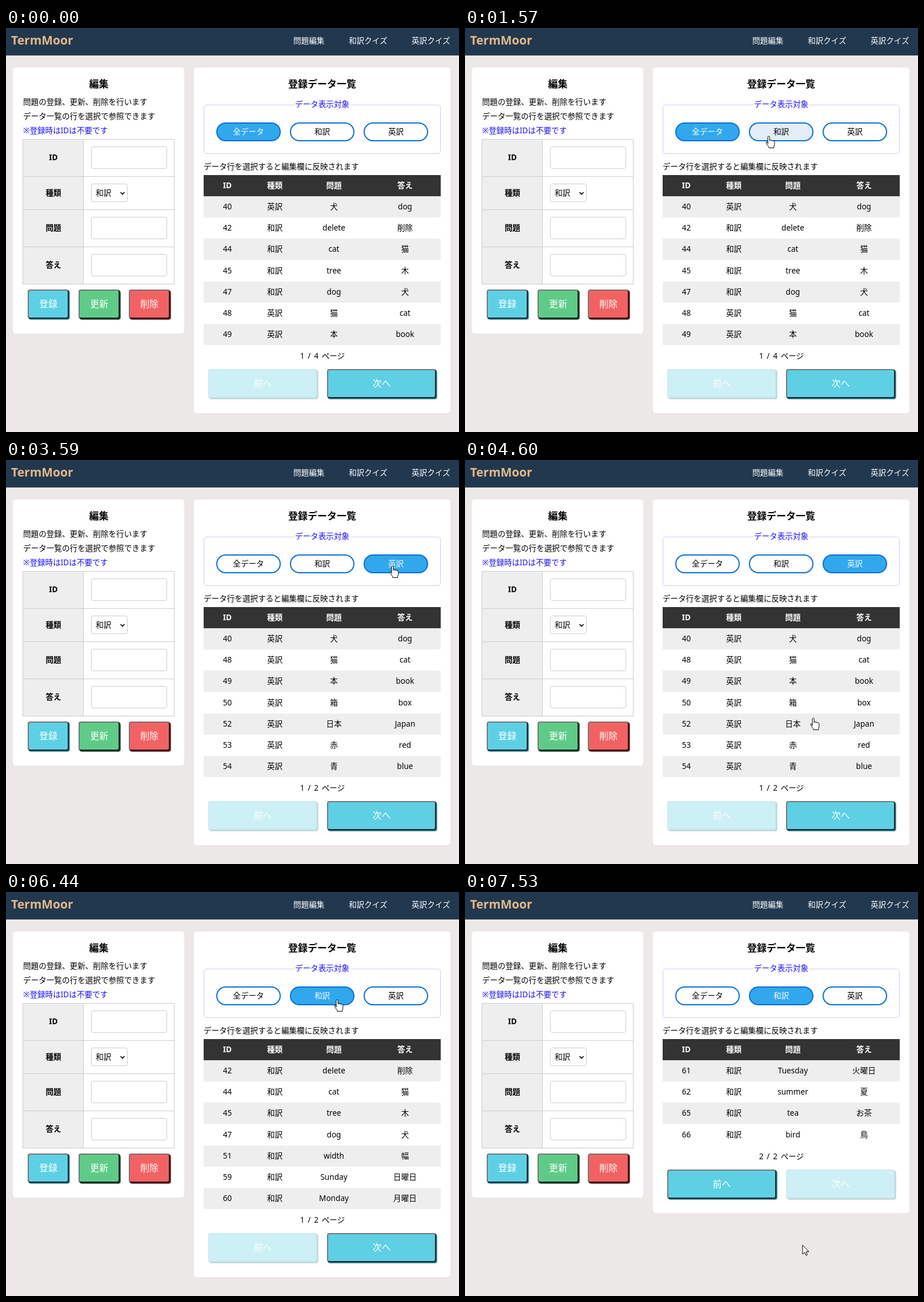
Recreate the animation shown at these times as an HTML page. Size 793 by 706 pixels, loop 7990 ms.

```html
<!DOCTYPE html>
<html lang="ja">
<head>
<meta charset="utf-8">
<title>TermMoor</title>
<style>
html, body { margin: 0; width: 100%; height: 100%; overflow: hidden; background: #ece8e7; }
body { position: relative; font: 13.6px/20px "Noto Sans", "Noto Sans CJK JP", sans-serif; color: #000; }
div { position: absolute; box-sizing: border-box; white-space: pre; }
.mid { width: 300px; text-align: center; }
.b { font-weight: 700; }
.head { font-size: 17px; font-weight: 700; }
.blue { color: #1a0dff; }
.white { color: #fff; }
.wide { word-spacing: 2.2px; }
.panel { background: #fff; border-radius: 5px; }
.field { background: #fff; border: 1px solid #ccc; border-radius: 4px; }
.pill { border: 2px solid #0a6fd3; border-radius: 17px; background: #fff; line-height: 28px; text-align: center; }
.pill.hover { background: #e3eef9; }
.pill.on { background: #31a8ee; color: #fff; }
.btn { border: 2px outset #767676; border-radius: 4px; color: #fff; font-size: 16px; line-height: 46px; text-align: center; }
.cyan { background: #5ed0e4; box-shadow: 1.7px 1.7px #1f7f93; }
.green { background: #5ecb88; box-shadow: 1.7px 1.7px #0f4a2c; }
.red { background: #f26263; box-shadow: 1.7px 1.7px #6d1018; }
.off { opacity: .3; border-color: rgba(118, 118, 118, .3); }
.dim { opacity: .8; }
svg { position: absolute; left: 0; top: 0; overflow: visible; }
</style>
</head>
<body>
<div id="page" style="left:0;top:0;width:793px;height:706px"></div>
<svg width="1" height="1"><path id="cursor" fill="#fff" stroke="#000" stroke-linejoin="round"/></svg>
<script>
const LOOP = 7990, ROW = 37.2;
const HAND = 'M-2 13V1.8a1.6 1.6 0 0 1 3.2 0V8q.3-1.6 1.6-1.5 1.4.1 1.5 1.7 .4-1.2 1.6-1 1.2.2 1.3 1.6 .5-.9 1.4-.6 1.3.5 1.3 2V14q0 2-1.2 4V20.5H0V19q-2-2.5-4.5-6.5 -1.2-2 .1-2.6 1.3-.4 2.4 1.6z';
const ARROW = 'M0 0V16L3.7 12.6 6 18 8.4 17 6.1 11.7H11Z';

const EN = '英訳', JA = '和訳';
const rows = (kind, list) => list.split(',').map(s => {
  const [id, q, a] = s.split(' ');
  return [id, kind, q, a];
});
const enRows = rows(EN, '40 犬 dog,48 猫 cat,49 本 book,50 箱 box,52 日本 Japan,53 赤 red,54 青 blue');
const jaRows = rows(JA, '42 delete 削除,44 cat 猫,45 tree 木,47 dog 犬,51 width 幅,59 Sunday 日曜日,60 Monday 月曜日');
const views = [
  { pos: '1 / 4', rows: [...jaRows.slice(0, 4), ...enRows.slice(0, 3)].sort((a, b) => a[0] - b[0]) },
  { pos: '1 / 2', rows: jaRows },
  { pos: '1 / 2', rows: enRows },
  { pos: '2 / 2', last: true, rows: rows(JA, '61 Tuesday 火曜日,62 summer 夏,65 tea お茶,66 bird 鳥') }
];
const pills = ['全データ', JA, EN];
const pillX = i => 368 + i * 129;

// [time, value] pairs
const picks = [[0, 0], [2230, 1], [3460, 2], [6050, 1]];
const shown = [[0, 0], [2370, 1], [3590, 2], [6180, 1], [7400, 3]];
const valueAt = (list, t) => list.reduce((v, e) => t >= e[0] ? e[1] : v, 0);

// cursor moves: first step, last step, number of steps, x, y
const moves = [
  [330, 1100, 12, 532, 194], [1500, 1570, 2, 532, 189],
  [2830, 3260, 7, 677, 185],
  [4320, 4780, 7, 591, 525], [4850, 4940, 2, 593, 508],
  [5140, 5350, 4, 593, 301], [5420, 5700, 5, 582, 183],
  [6440, 6440, 1, 580, 188], [6510, 7140, 10, 591, 617]
];

function cursorAt(t) {
  let x = 811, y = 735;
  for (const [a, b, n, tx, ty] of moves) {
    if (t < a) break;
    const step = t >= b ? n : Math.floor((t - a) / (b - a) * (n - 1) + .001) + 1;
    const k = 1 - (1 - step / n) ** 1.8;
    x += (tx - x) * k;
    y += (ty - y) * k;
  }
  return [x, y];
}

const box = (x, y, w, h, cls, css = '', text = '') =>
  `<div class="${cls}" style="left:${x}px;top:${y}px;width:${w}px;height:${h}px;${css}">${text}</div>`;
const fill = (x, y, w, h, color) => box(x, y, w, h, '', 'background:' + color);
const text = (x, y, s, cls = '', css = '') =>
  `<div class="${cls}" style="left:${x}px;top:${y - 10}px;${css}">${s}</div>`;
const mid = (x, y, s, cls = '') => text(x - 150, y, s, 'mid ' + cls);
const button = (x, y, w, cls, s) => box(x, y, w, 51, 'btn ' + cls, '', s);

function fixedPart() {
  let h = fill(0, 0, 793, 48, '#22384f') +
    text(9, 21, 'TermMoor', 'b', 'font-size:21px;color:#e3b887') +
    text(503, 22, '問題編集', 'white') + text(600, 22, '和訳クイズ', 'white') + text(710, 22, '英訳クイズ', 'white') +
    box(12, 69, 300, 464.5, 'panel') + mid(162.5, 98, '編集', 'head') +
    text(30, 129, '問題の登録、更新、削除を行います') +
    text(30, 154, 'データ一覧の行を選択で参照できます') +
    text(30, 179, '※登録時はIDは不要です', 'blue') +
    fill(30, 194, 106, 254, '#eee');
  for (const y of [194, 259, 317, 382, 447]) h += fill(30, y, 265, 1, '#ccc');
  for (const x of [29, 135, 294]) h += fill(x, 194, 1, 254, '#ccc');
  ['ID', '種類', '問題', '答え'].forEach((s, i) => h += mid(83, [226, 288, 349, 414][i], s, 'b'));
  for (const y of [207, 330, 395]) h += box(149, y, 133, 39, 'field');
  return h + box(149, 272, 64, 32, 'field') + text(157, 288, JA) +
    '<svg><path d="M200.5 287l3.5 3.5 3.5-3.5" fill="none" stroke="#000" stroke-width="1.7"/></svg>' +
    button(38, 457, 72, 'cyan', '登録') +
    button(127, 457, 72, 'green', '更新') +
    button(215, 457, 72, 'red', '削除');
}
const fixed = fixedPart();

function listPart(pick, view, hover) {
  const { pos, last, rows } = views[view], cols = [387.5, 470.5, 574, 698.5];
  const up = (7 - rows.length) * ROW;
  let h = box(329, 69, 449, 604 - up, 'panel') + mid(553.5, 98, '登録データ一覧', 'head') +
    box(346, 134, 415, 86, '', 'border:1px solid #ccf;border-radius:5px') +
    fill(505, 130, 97, 8, '#fff') + mid(553.5, 133, 'データ表示対象', 'blue') +
    text(346, 242, 'データ行を選択すると編集欄に反映されます') +
    fill(346, 257, 415, 37, '#333');
  pills.forEach((s, i) =>
    h += box(pillX(i), 165, 113, 33, 'pill' + (i == pick ? ' on' : i == hover ? ' hover' : ''), '', s));
  ['ID', '種類', '問題', '答え'].forEach((s, i) => h += mid(cols[i], 275, s, 'b white'));
  rows.forEach((r, i) => {
    if (i % 2 == 0) h += fill(346, Math.round(294 + i * ROW), 415, 37, '#eee');
    r.forEach((s, c) => h += mid(cols[c], Math.round(312 + i * ROW), s));
  });
  const y = Math.round(596.3 - up);
  return h + mid(554, y - 23, pos + ' ページ', 'wide') +
    button(354, y, 191, last ? 'cyan' : 'cyan off', '前へ') +
    button(562, y, 191, last ? 'cyan off' : hover == 'next' ? 'cyan dim' : 'cyan', '次へ');
}

// what the pointer is over: a pill index, 'row', 'next' or -1
function hitTest(x, y, view) {
  const inside = (l, t, w, h) => x >= l && x < l + w && y >= t && y < t + h;
  const { rows, last } = views[view];
  if (inside(346, 294, 415, rows.length * ROW)) return 'row';
  if (!last && inside(562, 596, 191, 51)) return 'next';
  return pills.findIndex((s, i) => inside(pillX(i), 165, 113, 33));
}

const page = document.getElementById('page'), cursor = document.getElementById('cursor');
let drawn = '';

function frame(now) {
  const t = now % LOOP, [x, y] = cursorAt(t);
  // the pointer shape lags a little behind the page
  const hover = t < 330 ? -1 : hitTest(x, y, valueAt(shown, t - 130));
  const pick = valueAt(picks, t), view = valueAt(shown, t);
  const key = [pick, view, hover].join();
  if (key != drawn) {
    page.innerHTML = fixed + listPart(pick, view, hover);
    drawn = key;
  }
  cursor.setAttribute('d', t < 330 ? '' : hover == -1 ? ARROW : HAND);
  cursor.setAttribute('transform', `translate(${Math.round(x)} ${Math.round(y)})`);
  requestAnimationFrame(frame);
}
requestAnimationFrame(frame);
</script>
</body>
</html>
```
